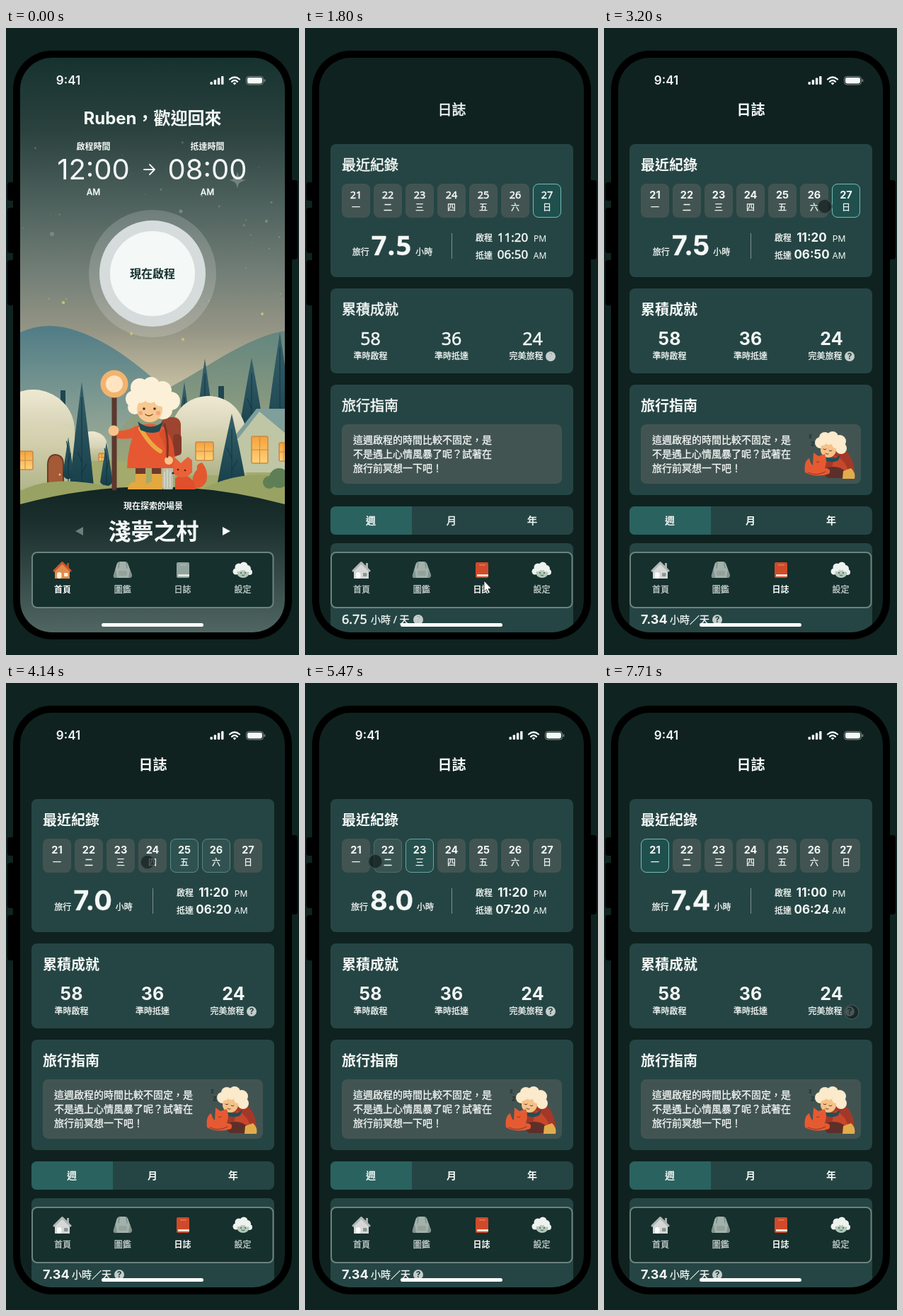
Recreate the animation shown at these times as an HTML page. Size 414x886 px, loop 8 s.

```html
<!DOCTYPE html>
<html lang="zh-TW">
<head>
<meta charset="utf-8">
<style>
html, body { margin: 0; width: 100%; height: 100%; overflow: hidden; background: #0f2321; }
svg { display: block; width: 414px; height: 886px; font-family: Inter, 'Noto Sans CJK TC', 'Noto Sans CJK', sans-serif; }
.plain text { font-family: 'Noto Sans', 'Noto Sans CJK TC', 'Noto Sans CJK', sans-serif; }
.plain text[font-weight="700"] { font-weight: 500; stroke: #f4f8f6; stroke-width: .5px; }
.plain .big { letter-spacing: 1px; font-weight: 600; }
</style>
</head>
<body>
<svg id="stage" viewBox="0 0 414 886"></svg>
<script>
const WHITE = '#f4f8f6';
const R = (x, y, w, h, fill, r = 0, more = '') => `<rect x="${x}" y="${y}" width="${w}" height="${h}" rx="${r}" fill="${fill}" ${more}/>`;
const C = (x, y, r, fill, more = '') => `<circle cx="${x}" cy="${y}" r="${r}" fill="${fill}" ${more}/>`;
const E = (x, y, rx, ry, fill) => `<ellipse cx="${x}" cy="${y}" rx="${rx}" ry="${ry}" fill="${fill}"/>`;
const P = (d, fill, more = '') => `<path d="${d}" fill="${fill}" ${more}/>`;
const L = (d, color, width) => P(d, 'none', `stroke="${color}" stroke-width="${width}" stroke-linecap="round" stroke-linejoin="round"`);
// medium weight gets a hairline outline, as the CJK face has only regular and bold
const T = (x, y, text, size = 12, weight = 500, fill = WHITE, anchor = 'middle') =>
  `<text x="${x}" y="${y}" font-size="${size}" font-weight="${weight}" fill="${fill}" text-anchor="${anchor}"${
    weight === 500 ? ` stroke="${fill}" stroke-width=".3"` : ''}>${text}</text>`;
const G = (id, body, more = '') => `<g id="${id}" ${more}>${body}</g>`;
const blobs = (list, fill) => list.map(([x, y, r]) => C(x, y, r, fill)).join('');
const gradient = (id, ...stops) => `<linearGradient id="${id}" x2="0" y2="1">${
  stops.map(([at, color]) => `<stop offset="${at}" stop-color="${color}"/>`).join('')}</linearGradient>`;

let seed = 11;
const random = () => (seed = seed * 16807 % 2147483647) / 2147483647;

// ---------- shared parts ----------
const defs = `<defs>
  <clipPath id="screen">${R(20, 42, 374, 812, '#000', 45)}</clipPath>
  ${gradient('sky', [0, '#16322f'], [.22, '#2b423f'], [.45, '#50635e'], [.65, '#737f77'], [.82, '#959585'], [1, '#c8c1a2'])}
  ${gradient('hillL', [0, '#507c86'], [.45, '#7f9a92'], [1, '#b9bb94'])}
  ${gradient('hillR', [0, '#64857f'], [.5, '#8d9d80'], [1, '#a9ac73'])}
  ${gradient('front', [0, '#122523'], [.25, '#1b302e'], [1, '#506662'])}
  ${gradient('wall', [0, '#e6e0c6'], [.5, '#d3d0ae'], [1, '#b0b488'])}
  ${gradient('dome', [0, '#efe9d2'], [1, '#d3d1b4'])}
  ${gradient('pine', [0, '#36606a'], [1, '#163f4a'])}
  ${gradient('glass', [0, '#f3a23c'], [1, '#ffd37a'])}
</defs>`;

const phone = R(2, 218, 14, 26, '#000', 4) + R(2, 254, 14, 64, '#000', 4) + R(2, 328, 14, 64, '#000', 4) +
  R(398, 215, 14, 112, '#000', 4) + R(10, 32, 394, 832, '#000', 55);

const statusBar = T(88, 80, '9:41', 17, 600) +
  [0, 1, 2, 3].map(i => R(288.5 + 5.2 * i, 76 - 2.7 * i, 3.4, 4 + 2.7 * i, WHITE, 1)).join('') +
  L('M316 72.5Q323 66.5 330 72.5M319 75.8Q323 72.3 327 75.8', WHITE, 2.3) + P('M320.6 78Q323 76 325.4 78L323 80.4Z', WHITE) +
  R(339.5, 68.5, 24, 11.5, 'none', 3.6, 'stroke="#7f908d"') + R(341, 70, 21, 8.5, WHITE, 2.4) + R(364.7, 72.3, 1.5, 4, '#7f908d', .7);

const houseIcon = on => P('M69 778V767L79.5 757L90 767V778Z', on ? '#e08c4e' : '#d3d7d5') + R(86, 756, 3, 7, on ? '#b14a26' : '#a9afad') +
  L('M68 767L79.5 755.5L91 767', on ? '#c9562d' : '#b2b7b5', 3) +
  R(72, 769, 6.5, 9, on ? '#fff0d8' : '#fafafa', 3) + R(82, 770, 5.5, 5, on ? '#fff0d8' : '#8d9593', 1);
const packIcon = P('M156 759Q157 754 162 754H167Q172 754 173 759L178 773Q178 777 174 777H155Q151 777 152 773Z', '#a3b1ab') +
  P('M152 773L155 765L157 777H155Q151 777 152 773ZM178 773L175 765L173 777H174Q178 777 178 773Z', '#82928c') +
  L('M160 755L159 763M170 755L171 763', '#7f908a', 1.5) + R(159, 767, 12, 7, '#93a29c', 2);
const bookIcon = on => R(241, 755, 18, 22, on ? '#cf4a2b' : '#93a39e', 2) + R(243, 772, 16, 3, on ? '#f4dfcc' : '#dfe5e2') +
  R(246, 758, 9, 1.5, on ? '#e67a54' : '#acb9b4');
const faceIcon = blobs([[325, 768, 4.5], [329, 762, 5.5], [336, 760, 5.5], [341, 764, 5], [344, 769, 4]], '#eef2ee') +
  E(335, 770, 8.5, 7, '#b3c8ba') + blobs([[329, 764.5, 3.5], [335, 763, 3.5], [341, 765, 3.5]], '#eef2ee') +
  C(332, 770, 1, '#425b52') + C(338, 770, 1, '#425b52') + L('M333 773Q335 775 337 773', '#425b52', 1);

const nav = active => R(37, 741, 340.5, 78, '#15302d', 7, 'stroke="#6d837f" stroke-width="2"') +
  houseIcon(active === 0) + packIcon + bookIcon(active === 2) + faceIcon +
  ['首頁', '圖鑑', '日誌', '設定'].map((s, i) =>
    T(80 + 84.8 * i, 798, s, 12, i === active ? 700 : 500, i === active ? '#fff' : '#c3cdca')).join('') +
  R(135, 841, 144, 5, '#fff', 2.5);

// ---------- home page ----------
const tree = (x, top, bottom, w) =>
  P(`M${x} ${top}Q${x + w * .3} ${(top + bottom) / 2} ${x + w / 2} ${bottom - 8}Q${x} ${bottom + 3} ${x - w / 2} ${bottom - 8}Q${x - w * .3} ${(top + bottom) / 2} ${x} ${top}Z`, 'url(#pine)') +
  L(`M${x} ${top + 22}V${bottom + 3}M${x} ${bottom - 25}l${w * .2} -14M${x} ${bottom - 42}l${-w * .16} -14`, '#12343e', 1);
const pane = (x, y, w, h) => R(x, y, w, h, 'url(#glass)', 2, 'stroke="#c98845" stroke-width="1.5"') +
  L(`M${x + w / 2} ${y}v${h}M${x} ${y + h / 2}h${w}`, '#c98845', 1);

const stars = Array.from({ length: 34 }, () =>
  C((24 + random() * 366).toFixed(1), (155 + random() * 285).toFixed(1), (.5 + random() * 1.2).toFixed(1), random() > .6 ? '#d8cf70' : '#c3cec4', 'opacity=".25"')).join('') +
  P('M327 203Q328 214 339 215Q328 216 327 227Q326 216 315 215Q326 214 327 203Z', '#71837f') +
  blobs([[65, 291, 3], [247, 259, 2.5], [368, 273, 2.2]], '#788980') +
  blobs([[81, 388, 2.2], [250, 440, 2.2], [362, 404, 2], [177, 432, 2]], '#c5bd73');

const village = P('M20 430Q58 413 100 428C160 448 200 490 250 530V660H20Z', 'url(#hillL)') +
  P('M394 428C330 438 260 500 200 522L150 580V670H394Z', 'url(#hillR)') +
  P('M20 628Q80 600 160 612T394 600V690H20Z', '#a3aa6c') +
  R(77, 512, 7, 30, '#1f4650') + R(300, 506, 8, 26, '#1f4650') +
  tree(281, 467, 600, 32) + tree(347, 466, 580, 36) + tree(387, 430, 600, 44) + tree(252, 500, 600, 24) +
  P('M98 612V592Q102 570 122 570Q142 572 144 592V612Z', 'url(#wall)') + P('M98 594Q104 570 122 570Q141 572 144 594Z', 'url(#dome)') + pane(131, 601, 9, 11) +
  P('M20 514Q48 505 74 523Q96 540 97 570V650Q60 660 20 652Z', 'url(#wall)') + P('M20 514Q48 505 74 523Q96 540 97 568Q60 552 20 562Z', 'url(#dome)') +
  pane(16, 598, 22, 26) + P('M59 651V616Q60 603 70 603Q81 604 81 616V651Z', '#a35a35', 'stroke="#6f3b26" stroke-width="2"') + C(76, 631, 1.5, '#f0c070') +
  P('M232 632V574Q240 522 286 520Q330 522 340 574V632Z', 'url(#wall)') + P('M231 574Q240 522 286 520Q331 522 341 574Q286 560 231 574Z', 'url(#dome)') +
  pane(268, 585, 25, 26) +
  P('M328 628V574L358 540L394 556V628Z', '#bfc6a5') + P('M322 578L354 538H394V572L358 542L328 580Z', '#7f9f9b') + pane(347, 577, 23, 38) + pane(386, 586, 12, 26) +
  tree(107, 500, 655, 34) + tree(88, 578, 640, 16) + tree(319, 545, 650, 40) + tree(142, 585, 650, 18) +
  P('M20 655Q60 630 150 648V690H20ZM394 636Q340 622 280 650V690H394Z', '#98a263') +
  blobs([[386, 636, 14], [372, 642, 9]], '#5e7f55') +
  P('M20 673Q207 623 394 673V854H20Z', 'url(#front)');

const traveller = R(221, 622, 15, 30, '#b9bfae', 2) + L('M224 627v22M228 624v26M232 627v22', '#e7e9dc', 1) +
  L('M153 512V650', '#5c372d', 7) + C(153, 503, 19.5, '#f2b36f') + C(153, 503, 12, '#ffe4c2') +
  R(219, 550, 28, 56, '#9d452f', 10) + R(236, 574, 12, 30, '#84382a', 5) +
  R(183, 618, 14, 16, '#6b3a2b') + R(206, 618, 13, 16, '#6b3a2b') +
  P('M183 630H198V652H172Q172 642 183 641ZM206 630H221V652H196Q196 643 206 641Z', '#e5a73f') +
  P('M185 562Q206 556 223 564Q238 590 239 622H171Q172 590 185 562Z', '#e65831') +
  P('M184 562Q172 570 157 569V580Q178 582 190 576Z', '#e65831') + C(152, 569, 7.5, '#f8c48c') +
  P('M222 566Q238 578 238 606L226 608Q226 588 216 574Z', '#d94d2a') + C(230, 611, 6, '#f8c48c') +
  L('M190 566Q204 590 218 598', '#eba844', 6) + L('M224 560Q230 580 228 606', '#7b3528', 3) +
  P('M186 556Q205 571 222 556L217 570Q205 575 190 568Z', '#1e4b53') +
  blobs([[181, 524, 12], [189, 508, 13], [205, 505, 12], [221, 512, 13], [233, 527, 13], [222, 540, 13], [182, 536, 10]], '#fcf0d8') +
  E(203, 539, 18, 18, '#f8c891') + blobs([[190, 521, 9], [204, 520, 10], [219, 525, 10]], '#fcf0d8') +
  C(195, 538, 1.8, '#44302a') + C(210, 538, 1.8, '#44302a') + L('M197 546Q202 550 207 546', '#7b3c2a', 1.3) + C(190, 544, 3, '#f3a477') + C(215, 544, 3, '#f3a477') +
  P('M266 650Q260 634 270 624Q268 616 277 614Q287 626 283 641Q277 652 266 650Z', '#e3582f') +
  P('M239 652V636Q254 626 266 642L268 652Z', '#df4f2b') +
  P('M236 624L238 606L247 615L257 606L263 611L263 628Q250 642 236 629Z', '#ea6037') + C(243, 624, 1.3, '#43241d') + C(253, 625, 1.3, '#43241d') + C(236, 629, 1.6, '#43241d');

const timeColumn = (x, label, time) => T(x, 172, label, 12, 600) + T(x, 214, time, 40, 400) + T(x, 236, 'AM', 12, 500);
const home = R(20, 42, 374, 470, 'url(#sky)') + stars + village + traveller +
  T(207, 136, 'Ruben，歡迎回來', 24, 700) + timeColumn(123.5, '啟程時間', '12:00') + timeColumn(284.5, '抵達時間', '08:00') +
  L('M195 200H210M203 193L210 200L203 207', WHITE, 1.8) +
  C(207, 347, 90, '#fff', 'opacity=".17"') + C(207, 347, 75, '#d6dcdc') + C(207, 347, 60, '#f4f8f6') + T(207, 353, '現在啟程', 16, 700, '#17332f') +
  T(208, 680, '現在探索的場景', 12, 600) + T(208.5, 723, '淺夢之村', 32, 700) +
  P('M109 705V717L98 711Z', '#6d7f7b') + P('M306 705V717L317 711Z', '#fff') + nav(0);

// ---------- journal page ----------
const DAYS = [['一', '7.4', '11:00', '06:24'], ['二', '7.9', '11:20', '07:14'], ['三', '8.0', '11:20', '07:20'],
  ['四', '8.2', '11:20', '07:32'], ['五', '7.0', '11:20', '06:20'], ['六', '8.3', '11:20', '07:38'], ['日', '7.5', '11:20', '06:50']];
const card = (y, h, title) => R(36, y, 343, h, '#254544', 8) + T(52, y + 37, title, 20, 700, WHITE, 'start');
const dayBox = i => R(52 + 45 * i, 220, 40, 48, '#425452', 8);
const dayText = i => T(72 + 45 * i, 241, 21 + i, 14.5, 700) + T(72 + 45 * i, 258, DAYS[i][0], 12, 500);
const pick = i => R(52.5 + 45 * i, 220.5, 39, 47, '#1f504e', 7.5, 'stroke="#73bdb9"');
const figures = ([, hours, start, end]) =>
  T(123.5, 321, `旅行<tspan dx="3" class="big" font-size="38" font-weight="700">${hours}</tspan><tspan dx="5">小時</tspan>`) +
  T(293.5, 302, start, 17, 700) + T(293.5, 326, end, 17, 700);
const help = (x, y) => C(x, y, 7, '#c4cdca') + T(x, y + 4.3, '?', 12, 700, '#254544');
const stat = (x, number, label, labelX = x) => T(x, 448, number, 25, 700) + T(labelX, 468, label, 12, 500);

const sleeper = P('M316 596Q346 586 353 620Q357 632 340 634L312 630Z', '#a43828') + P('M326 604Q344 612 346 632L320 630Z', '#c8472b') +
  P('M313 622Q330 616 342 627L338 636H316Q309 630 313 622Z', '#5c3029') + P('M338 626L349 622Q356 628 354 637H337Z', '#e2ac4c') +
  P('M308 600Q322 614 334 603L331 611Q320 616 310 610Z', '#1d5059') +
  blobs([[306, 586, 8], [312, 579, 8], [323, 578, 8], [333, 584, 9], [335, 594, 8]], '#fbeacb') +
  E(317, 596, 11, 11, '#f5c289') + blobs([[309, 585, 5], [318, 583, 6], [328, 588, 6]], '#fbeacb') +
  L('M310 595q2 2 4 0M318 597q2 2 4 0M313 601q2 2 4 1', '#67382b', 1) +
  P('M284 628Q282 612 290 608Q292 616 295 618L296 600L303 605L312 602Q316 612 312 622Q322 622 318 630Q300 636 284 628Z', '#e65a32') +
  L('M300 613q2 2 4 0M288 628Q300 634 313 627', '#8e3522', 1) + L('M293 585h4l-4 5h4M290 575h3l-3 4h3', '#2a3836', 1.3);

const tabs = R(36, 676, 343, 40, '#254544', 8) + P('M44 676H151V716H44Q36 716 36 708V684Q36 676 44 676Z', '#2a625f') +
  ['週', '月', '年'].map((s, i) => T(93 + 114 * i, 701, s, 14, 700)).join('');
const average = (value, unit) => T(52, 842, value, 18, 700, WHITE, 'start') + T(93, 841, unit, 14, 500, WHITE, 'start');

const journal = R(20, 42, 374, 812, '#0f2220') + T(207.5, 122.5, '日誌', 20, 700) +
  card(164, 188, '最近紀錄') + DAYS.map((_, i) => dayBox(i) + G('pick' + i, pick(i)) + dayText(i)).join('') +
  DAYS.map((day, i) => G('data' + i, figures(day))).join('') +
  R(207, 290, 1, 36, '#7e908d') +
  T(253, 301, '啟程') + T(253, 325.5, '抵達') + T(332, 301.5, 'PM', 12, 400) + T(332, 325.5, 'AM', 12, 400) +
  card(368, 120, '累積成就') + stat(92.5, 58, '準時啟程') + stat(207, 36, '準時抵達') + stat(321.5, 24, '完美旅程', 312.5) + help(347, 464) +
  card(504, 156, '旅行指南') + R(52, 560, 311, 84, '#425452', 8) +
  ['這週啟程的時間比較不固定，是', '不是遇上心情風暴了呢？試著在', '旅行前冥想一下吧！'].map((s, i) => T(68, 587 + 20 * i, s, 14, 500, WHITE, 'start')).join('') +
  G('sleeper', sleeper) + tabs + R(36, 728, 343, 140, '#254544', 8) +
  G('early', average('6.75', '小時 / 天')) + G('loaded', average('7.34', '小時／天')) + help(160, 836) +
  G('tip', R(193, 448, 128, 32, '#425452', 6) + T(257, 468.5, '準時啟程並準時抵達')) + nav(2);

// ---------- assembly ----------
const stage = document.getElementById('stage');
stage.innerHTML = defs + phone + G('view', G('home', home) + G('journal', journal) + G('status', statusBar), 'clip-path="url(#screen)"') +
  G('touch', C(0, 0, 10, '#101c1c', 'fill-opacity=".68" stroke="#3f514f" stroke-width="1.5"')) +
  G('arrow', P('M253 781V796.5L256.5 793.3L259 799L261.5 798L259 792.5H263.5Z', '#fff', 'stroke="#111" stroke-width=".8"'));

const parts = Object.fromEntries([...stage.querySelectorAll('g[id]')].map(g => [g.id, g]));
const show = (id, opacity) => {
  parts[id].style.display = opacity > 0 ? '' : 'none';
  parts[id].style.opacity = +opacity;
};
const clamp = v => Math.max(0, Math.min(1, v));

// time, x, y of the touch point
const PATH = [[450, 325, 827], [820, 283, 800], [1200, 252, 780], [2200, 252, 780], [2330, 212, 715], [2400, 196, 640], [2520, 230, 540],
  [2600, 298, 472], [2670, 348, 449], [2800, 348, 449], [3000, 338, 325], [3200, 312, 252], [3600, 306, 252], [3730, 258, 250], [4010, 257, 250],
  [4140, 200, 253], [4600, 200, 253], [4740, 165, 252], [5040, 160, 251], [5210, 120, 251], [5400, 114, 251], [5470, 99.5, 252],
  [5740, 64, 251], [6080, 64, 251], [6290, 104, 330], [6430, 174.5, 436], [6600, 274, 448], [6760, 341.5, 455.5], [7110, 350, 465]];
// start time and index of each chosen day
const PICKS = [[0, 6], [3420, 5], [3980, 4], [4400, 3], [4850, 2], [5400, 1], [5950, 0]];
const FADE = 300;

function touchAt(t) {
  const i = PATH.findIndex(k => k[0] > t);
  if (i < 0) return PATH.at(-1).slice(1);
  if (i === 0) return PATH[0].slice(1);
  const [t0, x0, y0] = PATH[i - 1], [t1, x1, y1] = PATH[i];
  const p = (t - t0) / (t1 - t0);
  return [x0 + (x1 - x0) * p, y0 + (y1 - y0) * p];
}

function draw(t) {
  const early = t >= 1800 && t < 1930;
  show('home', t < 1800);
  show('journal', t >= 1800);
  show('status', !early);
  show('early', early);
  show('loaded', !early);
  show('sleeper', t >= 2060);
  stage.classList.toggle('plain', early);

  // boxes cross-fade, figures switch midway
  const now = PICKS.findLastIndex(([start]) => start <= t);
  const mix = now ? clamp((t - PICKS[now][0]) / FADE) : 1;
  DAYS.forEach((_, i) => {
    const level = i === PICKS[now][1] ? mix : now && i === PICKS[now - 1][1] ? 1 - mix : 0;
    show('pick' + i, level);
    show('data' + i, level >= .5);
  });

  const arrow = t >= 1600 && t < 2260;
  show('arrow', arrow);
  show('touch', t >= 450 && !arrow);
  parts.touch.setAttribute('transform', `translate(${touchAt(t)})`);
  show('tip', t >= 7440 && t < 7710);
}

function loop() {
  draw(performance.now() % 8000);
  requestAnimationFrame(loop);
}
loop();
</script>
</body>
</html>
```
